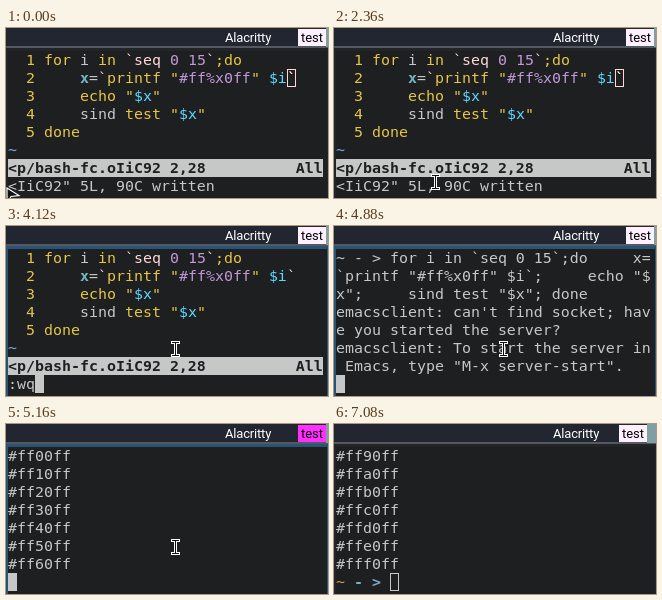
An HTML page for the animation above (8320 ms loop, 322 by 170 pixels).

```html
<!DOCTYPE html>
<html lang="en">
<head>
<meta charset="utf-8">
<title>Terminal</title>
<style>
html, body { margin: 0; width: 100%; height: 100%; overflow: hidden; background: #1d1f21; }
#stage { position: relative; width: 322px; height: 170px; overflow: hidden; background: #1d1f21; }
#stage > * { position: absolute; }
#bar { left: 0; top: 0; width: 322px; height: 18px; background: #222630; border-bottom: 2px solid #54595f; font: 13px/18px Roboto, sans-serif; color: #fff; }
#bar > * { position: absolute; }
#title { left: 219px; top: 1px; letter-spacing: -.18px; }
#tray { left: 292px; top: 0; }
#tray > * { position: absolute; }
#tag { left: 0; top: 1px; width: 28px; height: 17px; text-align: center; color: #000; }
#strip { left: 28px; top: 0; width: 10px; height: 19px; background: #7f9fa2; }
#frame { left: -1px; top: 20px; width: 319px; height: 150px; border: 3px solid; border-bottom: 0; }
#term, #cursor { font: 14.95px/18px "DejaVu Sans Mono", monospace; white-space: pre; color: #c5c8c6; }
#term { left: 2px; top: 23px; }
#term div { height: 18px; width: 315px; }
#cursor { width: 9px; height: 18px; box-sizing: border-box; overflow: hidden; }
#term .y { color: #e7c547; }
#term .o { color: #cfa03c; }
#term .m { color: #c397d8; }
#term .s { color: #ffd7d7; }
#term .p { color: #5fd7ff; }
#term .c { color: #74b5c4; font-weight: bold; }
#term .b { color: #7aa6da; }
#term .B { color: #7fa6d0; font-weight: bold; }
#term .r { display: block; background: #c5c8c6; color: #1d1f21; font-weight: bold; }
</style>
</head>
<body>
<div id="stage">
  <div id="frame"></div>
  <div id="term"></div>
  <div id="cursor"></div>
  <div id="bar">
    <span id="title">Alacritty</span>
    <div id="tray"><span id="tag">test</span><span id="strip"></span></div>
  </div>
  <svg id="arrow" width="16" height="12" style="left:0;top:159px">
    <path d="M1 1V16L5 9.5 13 8.5Z" fill="#111" stroke="#fff" stroke-width="1.2"/>
  </svg>
  <svg id="beam" width="12" height="18" style="left:0;top:0" stroke-linecap="square">
    <path d="M2.5 2.5H8.5M5.5 2.5V15.5M2.5 15.5H8.5" stroke="#fff" stroke-width="3"/>
    <path d="M2.5 2.5H8.5M5.5 2.5V15.5M2.5 15.5H8.5" stroke="#111"/>
  </svg>
</div>
<script>
const LOOP = 8320, TICK = 40;
const FG = '#c5c8c6', BG = '#1d1f21', PINK = '#ffd7d7';
const $ = id => document.getElementById(id);

// {k|text} gives text the colour class k
const paint = line => line.replace(/</g, '&lt;')
  .replace(/\{(\w)\|(.*?)\}/g, '<span class="$1">$2</span>');

const editor = [
  '{y|  1 for} i {y|in} {s|`seq }{m|0}{s| }{m|15}{s|`}{y|;do}',
  '{y|  2 }    {c|x}={s|`}{y|printf "}{m|#ff%x0ff}{y|"} {p|$i}{s|`}',
  '{y|  3 }    {y|echo "}{p|$x}{y|"}',
  '{y|  4 }    sind {y|test "}{p|$x}{y|"}',
  '{y|  5 done}',
  '{b|~}',
  '{r|<p/bash-fc.oIiC92 2,28          All}'
];
const shell = [
  '~ - > for i in `seq 0 15`;do     x=',
  '`printf "#ff%x0ff" $i`;     echo "$',
  'x";     sind test "$x"; done',
  "emacsclient: can't find socket; hav",
  'e you started the server?',
  'emacsclient: To start the server in',
  ' Emacs, type "M-x server-start".'
];
const colour = i => '#ff' + i.toString(16) + '0ff';

// [time, command line]
const typed = [[0, '<IiC92" 5L, 90C written'], [3320, ':'], [3520, ':w'], [3680, ':wq']];

// [time, x, y] of the text pointer
const path = [
  [80, 4, 164], [320, 44, 140], [560, 84, 113], [800, 101, 103],
  [1800, 101, 103], [2200, 102, 135], [2600, 103, 182],
  [2640, 110, 176], [2840, 150, 138], [3000, 170, 123],
  [6600, 170, 123], [6760, 150, 185]
];

const clamp = (v, lo, hi) => Math.max(lo, Math.min(hi, v));

function pointer(t) {
  const i = path.findIndex(p => p[0] > t);
  if (i < 1) return i ? path[path.length - 1].slice(1) : [-20, -20];
  const [t0, x0, y0] = path[i - 1], [t1, x1, y1] = path[i];
  const k = (t - t0) / (t1 - t0);
  return [x0 + (x1 - x0) * k, y0 + (y1 - y0) * k];
}

// rows on screen plus cursor column, row, character and colour
function screen(t) {
  if (t < 4880) {
    const cmd = typed.filter(s => s[0] <= t).pop()[1];
    const rows = [...editor, cmd];
    return cmd[0] === ':' ? { rows, col: cmd.length, row: 7, ch: '', ink: FG }
                          : { rows, col: 31, row: 1, ch: '`', ink: PINK };
  }
  const count = clamp(Math.floor((t - 4896) / 44) + 1, 0, 16);
  const out = Array.from({ length: count }, (_, i) => colour(i));
  const done = t >= 5640;
  const rows = [...shell, ...out, done ? '{o|~} {c|-} {B|>} ' : ''].slice(-8);
  return { rows, col: done ? 6 : 0, row: 7, ch: '', ink: FG };
}

function tagColour(t) {
  return t < 5000 ? colour(15) : colour(clamp(Math.floor((t - 5000) / 48), 0, 15));
}

let shown = '';
function draw(t) {
  t = Math.floor(t / TICK) * TICK;
  const s = screen(t), focused = t >= 2640 && t < 6680;
  const html = s.rows.map(r => '<div>' + paint(r) + '</div>').join('');
  if (html !== shown) $('term').innerHTML = shown = html;

  const c = $('cursor');
  c.textContent = s.ch;
  c.style.left = 2 + s.col * 9 + 'px';
  c.style.top = 23 + s.row * 18 + 'px';
  c.style.background = focused ? s.ink : 'none';
  c.style.boxShadow = focused ? 'none' : 'inset 0 0 0 1px ' + s.ink;
  c.style.color = focused ? BG : s.ink;

  $('frame').style.borderColor = focused ? '#285577' : '#222427';
  $('tray').style.left = t < 7080 ? '292px' : '285px';
  $('tag').style.background = tagColour(t);

  $('arrow').style.display = t < 80 ? '' : 'none';
  const [x, y] = pointer(t);
  $('beam').style.transform = `translate(${Math.round(x) - 6}px, ${Math.round(y) - 9}px)`;
}

const start = performance.now();
function tick() {
  draw((performance.now() - start) % LOOP);
  requestAnimationFrame(tick);
}
tick();
</script>
</body>
</html>
```
